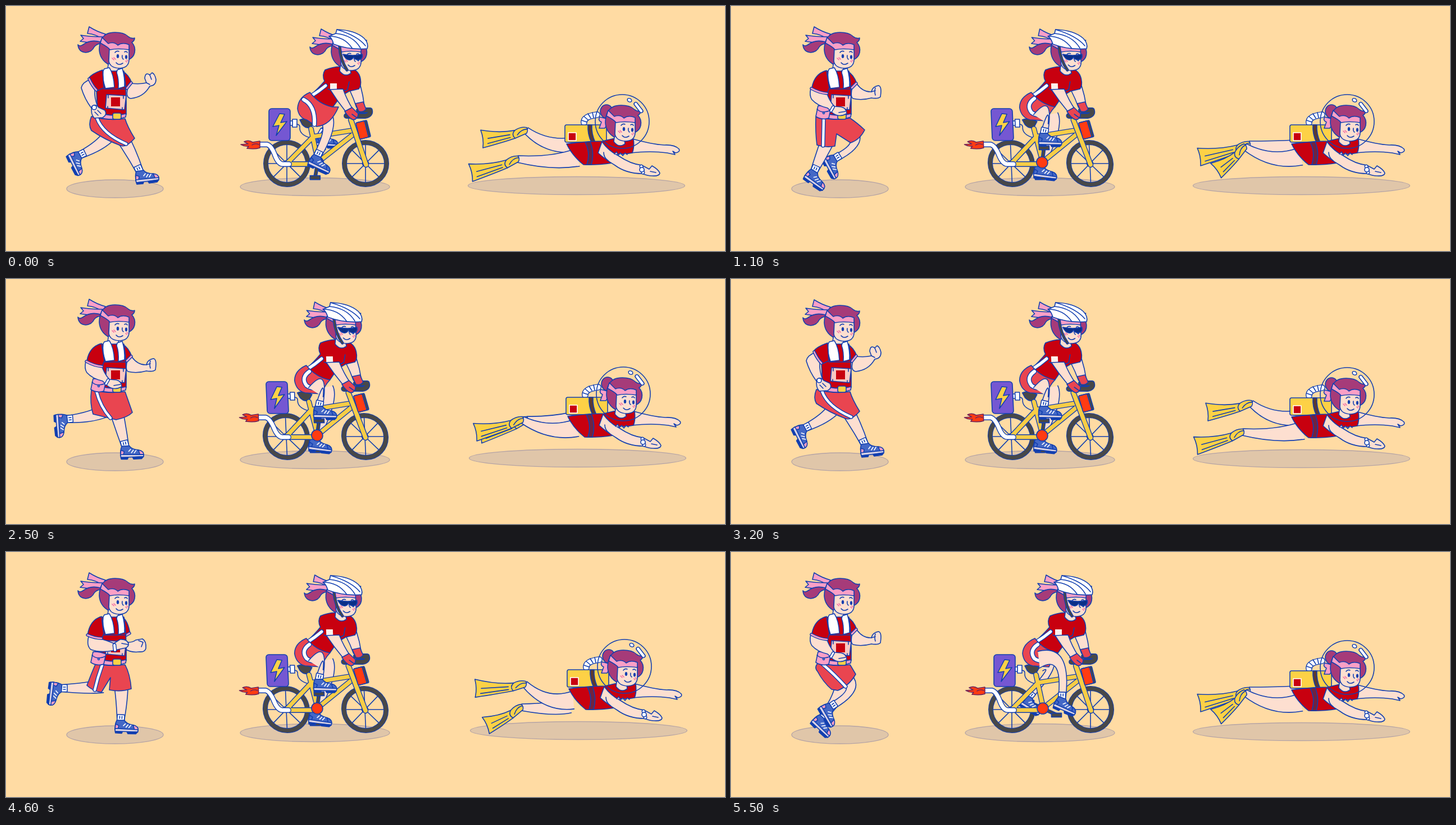
An HTML page for the animation above (5600 ms loop, 1280x437 px).

```html
<!DOCTYPE html>
<html lang="en">
<head>
<meta charset="utf-8">
<title>Run, ride, dive</title>
<style>
html,body{margin:0;width:100%;height:100%;overflow:hidden;background:#ffdba3}
svg{display:block;width:100vw;height:100vh}
.pose{visibility:hidden;animation:show8 calc(var(--n)*.1s) step-end calc((var(--i) - var(--n))*.1s - .002s) infinite}
.n4{--n:4;animation-name:show4}
.n7{--n:7;animation-name:show7}
.n8{--n:8}
@keyframes show4{0%{visibility:visible}25%,100%{visibility:hidden}}
@keyframes show7{0%{visibility:visible}14.2857%,100%{visibility:hidden}}
@keyframes show8{0%{visibility:visible}12.5%,100%{visibility:hidden}}
</style>
</head>
<body>
<svg id="stage" viewBox="0 0 1280 437" stroke="#123fb0" stroke-width="1.6" stroke-linejoin="round" stroke-linecap="round" fill="none"></svg>
<script>
const SKIN = '#fddfd0', RED = '#c8000f', SHORTS = '#e94550', HAIR = '#a63b79', PINK = '#fb9fc6',
  SHOE = '#4468c6', YELLOW = '#fdd146', DARK = '#484848', WHITE = '#fff', BLUSH = '#f9c8c2', INK = '#123fb0';

const p = (d, fill = 'none', more = '') => `<path d="${d}" fill="${fill}" ${more}/>`;
const g = (transform, body) => `<g transform="${transform}">${body}</g>`;
const move = (x, y, body) => g(`translate(${x} ${y})`, body);
const box = (x, y, w, h, fill, r = 0, more = '') =>
  `<rect x="${x}" y="${y}" width="${w}" height="${h}" rx="${r}" fill="${fill}" ${more}/>`;
const oval = (x, y, rx, ry, fill = 'none', more = '') =>
  `<ellipse cx="${x}" cy="${y}" rx="${rx}" ry="${ry}" fill="${fill}" ${more}/>`;
const tube = (d, w, color) => p(d, 'none', `stroke-width="${w + 2.8}"`) + p(d, 'none', `stroke="${color}" stroke-width="${w}"`);
const shadow = (x, y, rx) => oval(x, y, rx, 16, '#e0c6a9', 'stroke="#b5a4a5" stroke-width="1.3"');
const badge = (x, y, s, fill) => box(x, y, s, s, fill, 0, 'stroke="none"');
const pose = (n, i, body) => `<g class="pose n${n}" style="--i:${i}">${body}</g>`;

// Tapered, bent limb through three joints with a half-width at each.
function limb(h, k, a, w) {
  const unit = (x, y) => { const l = Math.hypot(x, y) || 1; return [x / l, y / l]; };
  const normal = (s, e) => unit(s[1] - e[1], e[0] - s[0]);
  const n1 = normal(h, k), n3 = normal(k, a), n2 = unit(n1[0] + n3[0], n1[1] + n3[1]);
  const bend = [0, 1].map(i => 1.4 * k[i] - .2 * (h[i] + a[i]));
  const at = (c, n, d) => (c[0] + n[0] * d).toFixed(1) + ',' + (c[1] + n[1] * d).toFixed(1);
  return p(`M${at(h, n1, w[0])} Q${at(bend, n2, w[1])} ${at(a, n3, w[2])} L${at(a, n3, -w[2])} Q${at(bend, n2, -w[1])} ${at(h, n1, -w[0])}`, SKIN);
}

const shoe = toe =>
  p('M-7,-2 L6,-4 Q11,2 22,2 Q33,3 33,11 L-7,16 Q-10,6 -7,-2Z', SHOE) +
  p('M23,2 Q33,3 33,10 L27,11Z M-8,5 L-2,7 L-3,14 L-8,15Z', toe) +
  p('M-8,13 L33,9 L33,13 L-7,18Z', '#d9d3e6') +
  p('M-7,18 L6,17 L5,20 L-6,21Z M14,16 L33,13 L30,17 L16,19Z', INK) +
  p('M9,2 L6,6 M14,3 L11,8 M19,3 L16,8', 'none', `stroke="${WHITE}"`);

function leg(h, k, a, angle, w = [12, 10, 6], toe = PINK) {
  const shin = Math.atan2(a[1] - k[1], a[0] - k[0]) * 180 / Math.PI - 90;
  return limb(h, k, a, w) +
    g(`translate(${a}) rotate(${shin})`, box(-6.5, -13, 13, 15, WHITE, 1) + p('M-2,-10 V-6 M2,-10 V-6')) +
    g(`translate(${a}) rotate(${angle})`, shoe(toe));
}

const neck = p('M183,97 L181,112 Q190,124 201,116 L200,109Z', SKIN);
const head =
  p('M182,104 Q167,95 166,78 Q166,66 171,58 Q177,47 194,47 Q210,47 217,54 Q223,59 229,57 Q229,62 224,65 Q231,72 229,83 Q227,92 218,96 L200,80Z', HAIR) +
  p('M184,76 L183,98 Q185,111 203,111 Q218,110 219,97 L219,76Z', SKIN) +
  p('M171,56 L182,67 Q192,63 199,70 Q207,64 219,69 L219,78 Q200,75 185,78 Q183,74 168,66Z', PINK) +
  oval(199, 89.5, 1.4, 2.6, INK) + oval(214, 91, 1.3, 2.6, INK) +
  p('M194,83 Q197,79 201,81 M211,82 Q214,80 216,83 M207,88 Q206,93 209,95 M196,101 Q201,107 208,102') +
  p('M189,93 L192,96 M192,92 L195,95 M213,98 L215,100 M215,96 L217,98', 'none', 'stroke="#f26ba0"');
const tail =
  p('M172,59 Q160,50 145,49 L148,37 Q162,46 177,50Z', PINK) +
  p('M172,55 Q150,55 133,52 L138,58 L132,63 Q150,66 170,66Z', PINK) +
  p('M168,64 Q150,59 137,69 Q131,73 128,69 Q129,82 142,83 Q153,82 157,73 Q161,68 168,67Z', HAIR);

/* Runner */

const bag = p('M155,178 Q165,177 178,182 L174,200 Q162,204 151,197Z', PINK) + p('M153,184 Q163,193 177,186') + oval(165, 191, 1.5, 1.5, WHITE);
const cuff = d => tube(d, 2.6, PINK);
const arms = {
  back: {
    far: p('M217,146 Q212,163 222,165 Q245,163 256,143 Q267,142 267,131 Q265,121 260,119 L256,123 Q248,117 247,129 L250,137 Q238,140 222,138Z', SKIN) +
      p('M256,123 L259,131 M250,137 L256,140') +
      p('M207,116 Q218,122 224,137 L214,149 L206,146Z', RED) + cuff('M223,137 L215,147'),
    near: p('M150,131 Q136,136 134,146 Q140,166 152,182 L163,179 Q157,163 158,150Z', SKIN) +
      p('M153,179 Q160,174 165,181 L176,186 Q181,194 172,199 L157,200 Q150,192 153,179Z', SKIN) +
      p('M163,186 L169,192 M158,189 L164,195') + oval(157, 181, 4, 4, WHITE) +
      p('M172,114 Q152,121 147,129 Q153,143 161,152 L174,146Z', RED) + cuff('M148,130 Q154,143 161,150')
  },
  mid: {
    far: p('M216,145 Q212,161 217,165 Q232,169 250,164 Q262,166 266,162 Q269,142 262,142 Q252,144 250,153 Q235,154 224,139Z', SKIN) +
      p('M257,146 Q255,152 257,159 M250,153 L257,151') +
      p('M207,116 Q218,122 224,138 L214,148 L206,145Z', RED) + cuff('M223,138 L215,146'),
    near: bag + p('M142,147 Q139,160 144,167 Q154,178 172,182 L180,190 Q192,200 206,192 Q206,182 196,180 L184,179 Q174,168 170,153Z', SKIN) +
      p('M192,190 L204,188') + tube('M182,180 L178,187', 3, WHITE) +
      p('M170,115 Q148,121 144,146 Q157,154 171,157 L175,146Z', RED) + cuff('M143,147 Q157,155 171,156')
  },
  front: {
    far: p('M213,161 Q225,162 231,157 L243,155 Q250,159 249,172 Q247,179 238,178 Q223,180 212,173Z', SKIN) +
      p('M236,158 L244,161 L241,169') +
      p('M207,116 Q217,122 221,146 L213,151 L206,146Z', RED) + cuff('M220,145 L213,149'),
    near: bag + p('M147,151 Q143,167 151,174 Q167,180 190,176 L208,172 Q219,171 218,163 Q215,155 203,156 L192,163 Q180,158 169,155Z', SKIN) +
      p('M206,163 L217,165') + tube('M193,166 L194,175', 4, WHITE) +
      p('M170,115 Q149,121 145,149 Q157,154 170,155 L174,146Z', RED) + cuff('M145,148 Q158,154 170,154')
  }
};

const runnerTorso =
  p('M167,116 L210,116 Q215,150 214,193 Q188,199 163,189 L161,150Z', RED) + p('M174,148 H214') +
  p('M163,190 Q190,199 214,192 L213,198 Q190,206 162,198Z', PINK) + box(190, 191, 15, 11, YELLOW, 3) +
  p('M179,158 L214,160 L211,185 L177,182Z', BLUSH) + p('M182,159 V164 M209,160 V165 M181,179 V183 M207,181 V185') +
  badge(187, 163, 16, RED);
const towel =
  p('M175,112 L184,110 Q192,122 193,145 L177,147 Q171,130 173,116Z', WHITE) +
  p('M198,114 L207,111 Q212,128 211,144 L200,147 Q201,130 197,119Z', WHITE);

const stride = [
  { near: [[203, 228], [222, 260], [239, 297], 0], far: [[185, 228], [168, 248], [129, 267], 70], arm: 'back',
    shorts: 'M152,197 Q146,212 152,222 Q175,238 204,249 Q214,253 229,236 Q216,215 212,201 Q180,205 152,197Z', stripe: 'M162,200 Q172,228 214,246' },
  { near: [[195, 230], [204, 265], [213, 301], 5], far: [[182, 232], [152, 246], [106, 250], 92], arm: 'mid', bob: -1,
    shorts: 'M152,198 Q149,222 155,241 L196,251 Q216,247 225,238 L212,201 Q180,205 152,198Z', stripe: 'M161,200 Q168,228 186,248' },
  { near: [[181, 235], [182, 265], [176, 303], 16], far: [[180, 238], [166, 242], [147, 235], 116], arm: 'front',
    shorts: 'M154,198 Q156,226 164,245 Q178,252 190,248 Q208,252 222,240 Q219,216 212,201 Q180,205 154,198Z', stripe: 'M159,200 Q165,225 171,248' },
  { near: [[172, 240], [160, 268], [147, 297], 42], far: [[208, 220], [230, 244], [183, 273], 68], arm: 'mid',
    shorts: 'M151,198 Q150,225 153,248 Q169,253 185,250 L188,228 L213,244 Q230,238 238,221 Q224,208 212,200 Q180,205 151,198Z', stripe: 'M165,201 L164,249' },
  { near: [[172, 230], [160, 252], [126, 267], 70], far: [[204, 228], [222, 260], [239, 297], 0], arm: 'back',
    shorts: 'M152,197 Q147,215 146,232 Q158,243 174,246 L188,229 L211,251 Q222,248 230,236 Q220,214 212,201 Q180,205 152,197Z', stripe: 'M167,201 Q164,222 159,241' },
  { near: [[170, 235], [152, 245], [103, 254], 90], far: [[204, 240], [213, 268], [223, 301], 5], arm: 'mid', bob: -1,
    shorts: 'M158,198 Q150,219 145,236 Q156,247 171,249 L187,232 L199,249 Q215,249 226,240 Q220,216 212,201 Q180,205 158,198Z', stripe: 'M170,201 Q163,224 158,245' },
  { near: [[172, 239], [143, 243], [96, 243], 103], far: [[205, 240], [206, 268], [204, 303], 9], arm: 'front',
    shorts: 'M160,198 Q151,219 144,238 Q156,249 170,250 L186,224 L184,246 Q205,250 223,244 Q221,218 212,201 Q180,205 160,198Z', stripe: 'M171,202 Q163,224 158,246' },
  { near: [[200, 222], [223, 245], [176, 277], 66], far: [[198, 232], [190, 262], [161, 297], 50], arm: 'mid',
    shorts: 'M156,197 Q147,205 154,213 Q164,232 179,245 L190,247 Q210,239 222,218 L212,201 Q180,205 156,197Z', stripe: 'M163,200 Q184,218 204,240' }
];

const runner = stride.map((s, i) => pose(8, i,
  leg(...s.far) + leg(...s.near) + p(s.shorts, SHORTS) + tube(s.stripe, 4.4, WHITE) +
  arms[s.arm].far + neck + runnerTorso + towel + arms[s.arm].near + move(0, s.bob || 0, tail + head))).join('');

/* Cyclist */

const wheel = x => {
  let spokes = '';
  for (let a = 0; a < 8; a++) {
    const t = a * Math.PI / 4;
    spokes += `M${x},281 l${33 * Math.cos(t)},${33 * Math.sin(t)}`;
  }
  return p(spokes) + `<circle cx="${x}" cy="281" r="37.5" stroke-width="9"/>` +
    `<circle cx="${x}" cy="281" r="37.5" stroke="${DARK}" stroke-width="7"/>` + oval(x, 281, 5.5, 5.5, '#ff3b12');
};

const bikeBack = wheel(500) + wheel(640) +
  box(468, 183, 38, 57, '#7557d2', 5) + p('M487,192 L475,215 L486,213 L481,231 L500,206 L489,208 L496,193Z', YELLOW) +
  box(506, 205, 5, 8, WHITE) + box(510, 202, 8, 14, WHITE) + p('M518,211 Q524,211 523,219 Q524,231 545,236') +
  p('M523,203 Q534,198 549,206 Q546,211 543,217 Q533,219 527,211Z', DARK);
const bikeFrame =
  tube('M500,281 L547,233 L616,222 M556,278 L622,226 M543,219 L556,279 M500,282 H555', 7, '#f8cd45') +
  tube('M614,203 L641,283', 7.5, '#f8cd45') +
  g('rotate(-14 635 221)', box(627, 206, 19, 30, DARK, 2) + box(626, 206, 16, 30, '#ff3b12', 2)) +
  tube('M452,247 L465,247 Q472,249 478,264 Q484,281 492,282 L504,282', 7, WHITE) +
  p('M452,241 L439,243 Q432,238 424,242 L431,246 L418,247 Q425,251 432,250 L429,254 Q443,256 452,253Z', '#ff3b12', 'stroke="#6d245c"') +
  p('M450,247 Q443,244 438,248', 'none', 'stroke="#6d245c"');
const bars = tube('M606,196 H640 Q650,194 648,186 H628', 7, DARK);

const farArm = p('M611,148 Q619,165 624,181 L638,179 Q636,160 631,142Z', SKIN) + p('M622,174 L636,171 L641,184 Q636,190 628,188Z', SHORTS);
const nearArm = p('M577,149 Q590,170 606,190 L618,185 Q607,168 600,148Z', SKIN) + p('M603,188 L616,181 L627,192 Q627,202 618,203 Q610,200 603,188Z', SHORTS) + p('M616,193 L624,199');
const jersey =
  p('M568,114 Q590,105 608,110 Q628,112 631,130 Q633,142 628,148 L611,152 Q596,160 590,169 L582,180 Q557,177 541,160 Q556,147 567,134 Q562,123 568,114Z', RED) +
  tube('M569,142 Q557,152 544,160', 5, WHITE) + p('M573,148 Q592,157 608,149 L611,135', RED) +
  badge(577, 138, 12, '#fff1ee');
const helmet =
  p('M594,72 Q595,96 607,114', 'none', 'stroke-width="5.5"') + p('M594,72 Q595,96 607,114', 'none', `stroke="${DARK}" stroke-width="3"`) +
  p('M583,68 Q581,58 575,54 L587,49 L589,42 Q622,43 638,58 Q646,67 643,76 Q612,79 583,68Z', WHITE) +
  p('M587,49 Q618,52 631,75 M589,42 Q626,53 640,71 M575,54 Q602,54 616,75') +
  p('M600,86 Q618,90 634,86 Q636,95 627,96 Q621,96 619,91 Q616,97 610,96 Q604,95 600,86Z', '#0b2f86');
const riderHead = move(413, 4, neck + tail + head) + helmet;

const shortsLow = p('M541,154 Q520,163 519,183 Q521,199 535,203 L553,215 Q578,213 592,180 L581,180 Q557,175 541,154Z', SHORTS) + tube('M530,167 Q551,178 549,211', 6, WHITE);
const shortsHigh = p('M541,154 Q520,163 519,181 Q521,199 537,203 L566,205 Q572,190 582,180 Q557,175 541,154Z', SHORTS) + tube('M546,165 Q530,176 540,190 Q546,195 562,195', 6, WHITE);

const crankAngle = [100, 150, 200, 240, 280, 330, 25];
const crank = deg => {
  const t = deg * Math.PI / 180, x = 555 + 27 * Math.cos(t), y = 279 + 27 * Math.sin(t);
  return tube(`M555,279 L${x},${y}`, 4, DARK) + box(x - 9, y - 3, 18, 7, DARK);
};
const pedal = [
  { near: [[560, 195], [581, 210], [553, 270], 32], far: [[572, 193], [585, 188], [560, 232], 10], lean: 0, low: true },
  { near: [[558, 196], [572, 212], [535, 270], 42], far: [[572, 193], [594, 186], [580, 238], 12], lean: .3, low: true },
  { near: [[554, 198], [570, 200], [527, 252], 36], far: [[572, 193], [598, 188], [592, 254], 22], lean: .7 },
  { near: [[554, 201], [572, 184], [541, 234], 22], far: [[572, 193], [594, 208], [580, 272], 28], lean: 1 },
  { near: [[556, 202], [573, 176], [560, 230], 8], far: [[574, 193], [580, 222], [550, 288], 14], lean: 1 },
  { near: [[550, 197], [590, 178], [589, 241], 14], far: [[568, 198], [574, 214], [534, 274], 40], lean: .5 },
  { near: [[548, 192], [591, 187], [589, 263], 30], far: [[560, 200], [574, 206], [529, 260], 38], lean: 0 }
];

const rider = pedal.map((s, i) => {
  const near = leg(...s.near, [15, 12, 6.5], SHOE);
  const hips = s.low ? near + shortsLow : shortsHigh + near;
  const k = s.lean * .043;
  return pose(7, i, g(`matrix(1 0 ${k} 1 ${-305 * k} 0)`,
    bikeBack + crank(crankAngle[i] + 180) + leg(...s.far, [13, 11, 6], SHOE) + bikeFrame +
    crank(crankAngle[i]) + oval(555, 279, 10, 10, '#ff3b12') + bars + farArm + jersey + hips + nearArm + riderHead));
}).join('');

/* Diver */

function fin([x, y], [tx, ty]) {
  const angle = Math.atan2(y - ty, x - tx) * 180 / Math.PI, l = Math.hypot(x - tx, y - ty);
  return g(`translate(${x} ${y}) rotate(${angle})`,
    p(`M2,-5 Q-8,-9 -20,-4 Q${-l * .6},-4 ${-l},-16 Q${-l + 3},0 ${-l - 2},16 Q${-l * .55},13 -22,10 L0,5 Q4,0 2,-5Z`, YELLOW) +
    p(`M-20,-4 Q-28,2 -22,10 M-17,5 Q-8,-4 2,-2 M-30,2 L${-l + 10},1 M-30,7 L${-l + 8},10`));
}
const diverLeg = (h, k, a, tip, w) => limb(h, k, a, w) + fin(a, tip);

const diverBack =
  p('M1112,236 Q1150,247 1172,248 Q1190,247 1198,255 Q1201,260 1192,262 L1187,259 L1191,265 L1177,262 Q1148,258 1112,262Z', SKIN) +
  tube('M1029,208 Q1028,197 1052,194', 9, WHITE) + p('M1025,204 L1034,207 M1029,197 L1036,203 M1036,192 L1041,200 M1044,190 L1046,199') +
  box(995, 212, 74, 31, YELLOW, 3) + p('M1036,212 Q1035,228 1042,243 L1049,243 Q1042,228 1043,212Z', '#5a3a32') +
  box(1001, 226, 14, 14, RED, 0, `stroke="${WHITE}"`);
const diverFront =
  p('M998,246 Q1030,241 1062,241 L1088,235 L1117,237 Q1119,252 1115,262 Q1096,266 1081,263 L1079,280 Q1052,284 1028,283 Q1008,267 998,246Z', RED) +
  p('M1031,243 Q1041,262 1034,283 L1042,283 Q1048,262 1040,242Z', '#702340') +
  p('M1061,242 Q1072,258 1090,267 Q1112,282 1132,284 L1145,291 L1150,285 Q1162,292 1164,298 Q1163,304 1150,303 Q1142,303 1133,299 Q1104,299 1084,284 Q1066,273 1054,262Z', SKIN) +
  p('M1064,261 Q1064,270 1072,276 M1147,295 L1157,297') + p('M1083,264 l4,-4 3,6 4,-4 4,5 4,-5 4,3', BLUSH) +
  tube('M1131,286 L1134,297', 4, WHITE) + oval(1132, 292, 4, 4, WHITE) +
  oval(1069, 188, 11, 12, HAIR) + p('M1073,202 L1057,198 Q1053,204 1060,207 L1056,218 L1066,218 L1074,206Z', PINK) +
  move(901, 130, neck + head) +
  oval(1097, 206, 48, 48) +
  g('rotate(52 1126 181)', box(1115, 178, 22, 6, WHITE, 3)) + g('rotate(30 1110 168)', oval(1110, 168, 4, 3, WHITE));

const kick = [
  { far: [[1004, 248], [962, 247], [926, 222], [848, 237]], near: [[1018, 270], [970, 279], [911, 273], [828, 297]], at: [0, 0] },
  { far: [[1004, 252], [964, 257], [925, 252], [842, 278]], near: [[1015, 266], [966, 274], [917, 252], [834, 274]], at: [2, -1] },
  { far: [[1000, 276], [968, 282], [914, 279], [851, 311]], near: [[1006, 266], [960, 270], [920, 238], [832, 245]], at: [4, -2] },
  { far: [[1004, 252], [964, 252], [922, 247], [834, 269]], near: [[1015, 268], [964, 276], [915, 251], [864, 293]], at: [0, 0] }
];
const diver = kick.map((s, i) => pose(4, i, move(...s.at,
  shadow(1015.5, 320.5, 193) + diverLeg(...s.far, [13, 12, 6]) + diverBack +
  diverLeg(...s.near, [16, 12, 6]) + diverFront))).join('');

document.getElementById('stage').innerHTML =
  shadow(194, 326, 86) + shadow(550, 322.5, 133) + runner + rider + diver;
</script>
</body>
</html>
```
